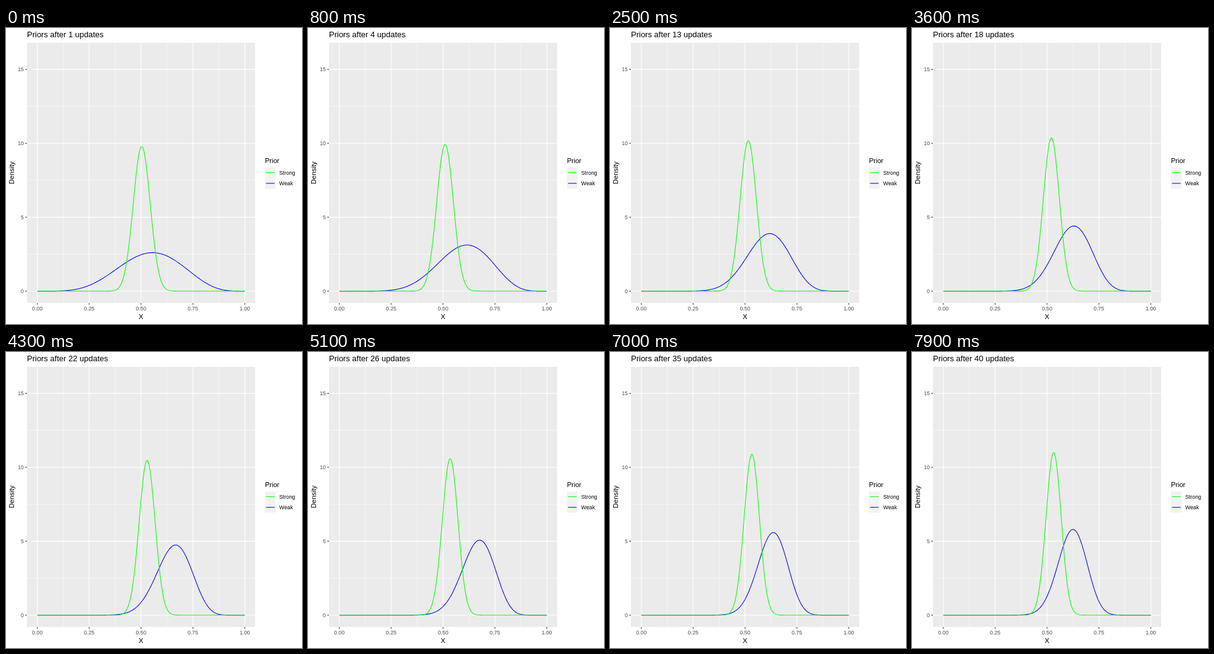
These frames come from a looping animation (480x480 px, 8 s). An HTML page:

```html
<!DOCTYPE html>
<html lang="en">
<head>
<meta charset="utf-8">
<title>Prior updates</title>
<style>
  html, body { margin: 0; width: 100%; height: 100%; overflow: hidden; background: #fff; }
  svg { display: block; width: 480px; height: 480px; font: 11px "Liberation Sans", Arial, sans-serif; }
  .small { font-size: 8.8px; }
  .axis { fill: #4d4d4d; }
  .curve { fill: none; stroke-width: 1.07; stroke-linejoin: round; }
</style>
</head>
<body>
<svg viewBox="0 0 480 480">
  <rect x="34" y="24" width="370" height="421.9" fill="#ebebeb"/>
  <g id="grid"></g>
  <path id="weak" class="curve" stroke="#00f"/>
  <path id="strong" class="curve" stroke="#0f0"/>
  <text id="title" x="34" y="15" font-size="13"></text>
  <text x="219" y="472" text-anchor="middle">X</text>
  <text transform="translate(13 234.8) rotate(-90)" text-anchor="middle">Density</text>
  <text x="420" y="219">Prior</text>
  <rect x="420" y="226" width="17.3" height="34.5" fill="#f2f2f2"/>
  <path class="curve" stroke="#0f0" d="M421.7 234.6h13.8"/>
  <path class="curve" stroke="#00f" d="M421.7 251.9h13.8"/>
  <text class="small" x="443" y="237.8">Strong</text>
  <text class="small" x="443" y="255">Weak</text>
</svg>
<script>
const $ = id => document.getElementById(id);
const X = v => 50.8 + 336.4 * v;
const Y = v => 426.7 - 23.97 * v;

// One coin flip per update, 1 = success
const flips = '1' + '10110101' + '1101' + '101101' + '1110111' + '01010' + '101010101';
const FRAME = 100, FRAMES = 2 * flips.length;

function drawGrid() {
  const line = (d, color, width) => `<path d="${d}" stroke="${color}" stroke-width="${width}"/>`;
  const label = (x, y, anchor, text) =>
    `<text class="small axis" x="${x}" y="${y}" text-anchor="${anchor}">${text}</text>`;
  const vertical = (v, width) => line(`M${X(v)} 24V445.9`, '#fff', width);
  const horizontal = (v, width) => line(`M34 ${Y(v)}H404`, '#fff', width);
  let minor = '', major = '';
  for (let i = 0; i < 4; i++) {
    minor += vertical(i / 4 + 0.125, 0.53);
    if (i < 3) minor += horizontal(i * 5 + 2.5, 0.53);
    major += horizontal(i * 5, 1.07) + line(`M31.2 ${Y(i * 5)}H34`, '#333', 1.07)
      + label(29, Y(i * 5) + 3.2, 'end', i * 5);
  }
  for (let v = 0; v <= 1; v += 0.25) {
    major += vertical(v, 1.07) + line(`M${X(v)} 445.9v2.8`, '#333', 1.07)
      + label(X(v), 458, 'middle', v.toFixed(2));
  }
  $('grid').innerHTML = minor + major;
}

const logFactorial = n => n < 2 ? 0 : Math.log(n) + logFactorial(n - 1);

function betaPath(a, b) {
  const scale = logFactorial(a + b - 1) - logFactorial(a - 1) - logFactorial(b - 1);
  const points = [];
  for (let i = 0; i <= 300; i++) {
    const x = i / 300;
    const density = Math.exp(scale + (a - 1) * Math.log(x) + (b - 1) * Math.log(1 - x));
    points.push(X(x).toFixed(2) + ' ' + Y(density).toFixed(2));
  }
  return 'M' + points.join('L');
}

let shown = -1;
function render(now) {
  const frame = Math.floor(now / FRAME) % FRAMES;
  if (frame !== shown) {
    shown = frame;
    // The title follows the curves one frame later
    const n = Math.floor(frame / 2) + 1;
    const count = Math.max(1, Math.floor((frame + 1) / 2));
    const wins = [...flips.slice(0, n)].filter(c => c === '1').length;
    $('weak').setAttribute('d', betaPath(5 + wins, 5 + n - wins));
    $('strong').setAttribute('d', betaPath(75 + wins, 75 + n - wins));
    $('title').textContent = `Priors after ${count} updates`;
  }
}

drawGrid();
render(0);
const start = performance.now();
(function tick() {
  render(performance.now() - start);
  requestAnimationFrame(tick);
})();
</script>
</body>
</html>
```
